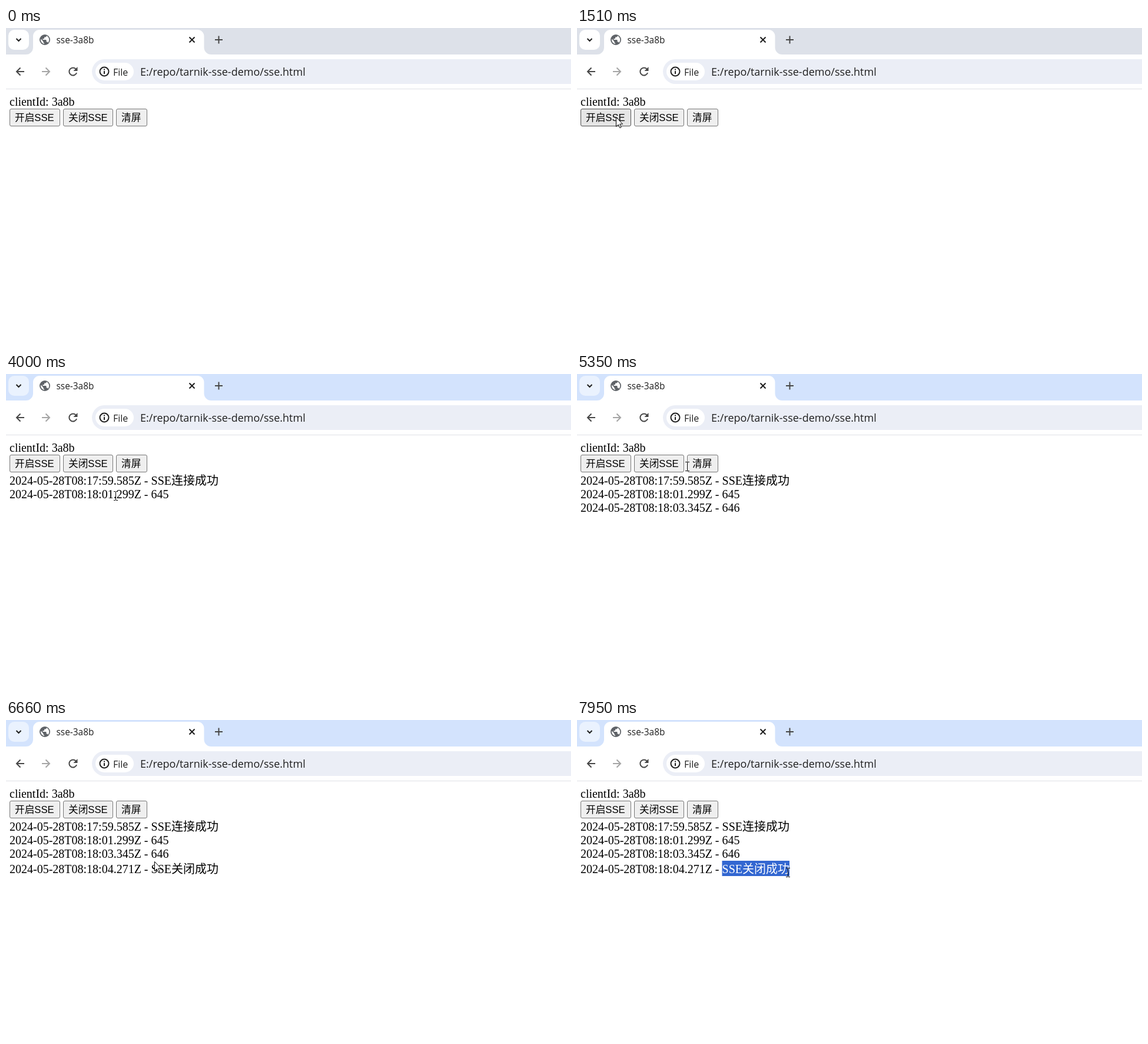
An HTML page for the animation above (8000 ms loop, 960x540 px).

```html
<!DOCTYPE html>
<html lang="zh-CN">
<head>
<meta charset="utf-8">
<title>sse-3a8b</title>
<style>
  html, body { margin: 0; width: 100%; height: 100%; overflow: hidden; background: #fff; }
  svg { display: block; width: 960px; height: 540px; }
  text { white-space: pre; }
  .ui { font-family: "Open Sans", "Noto Sans", sans-serif; fill: #1f1f1f; }
  .page { font: 20px "Liberation Serif", "Noto Sans CJK SC", "Noto Sans CJK", serif; }
  .btn text { font: 16.67px "Liberation Sans", "Noto Sans CJK SC", "Noto Sans CJK", sans-serif; }
  .btn rect { fill: #efefef; stroke: #767676; }
  .btn.hover rect { fill: #e5e5e5; stroke: #4f4f4f; }
  .btn.down rect { fill: #f5f5f5; stroke: #8d8d8d; }
  .icon { fill: none; stroke: #474747; stroke-width: 2; }
  .dark { stroke: #1f1f1f; }
  .off { stroke: #a5a5a5; }
  #strip { fill: #dde1e9; }
  #menu { fill: #fff; }
  .active #strip { fill: #d3e3fd; }
  .active #menu { fill: #eaf2fe; }
</style>
</head>
<body>
<svg id="stage" viewBox="0 0 960 540">
  <defs><clipPath id="clip"><rect class="marked" y="239" height="26"/></clipPath></defs>

  <!-- tab strip -->
  <rect id="strip" width="960" height="45"/>
  <rect id="menu" x="4" y="3" width="35" height="34" rx="10"/>
  <path d="M17.500 18l4 4 4-4" class="icon dark"/>
  <path d="M34 45a12 12 0 0 0 12-12V14a11 11 0 0 1 11-11H325.500a11 11 0 0 1 11 11V33a12 12 0 0 0 12 12Z" fill="#fff"/>
  <circle cx="66" cy="20" r="9" fill="#5f6368"/>
  <path d="M65 27A7.200 7.200 0 0 1 59 18.400l4.300 4.300v1q0 1.700 1.700 1.800ZM71.300 24.900q-.4-1.300-1.700-1.300h-1v-2.700q0-.9-.9-.9h-5.300v-1.800h1.800q.9 0 .9-.9v-1.800h1.800q1.800 0 1.800-1.800v-.4A7.200 7.200 0 0 1 71.300 24.900Z" fill="#fff"/>
  <text class="ui" x="85.500" y="26" font-size="15.400">sse-3a8b</text>
  <path d="M311.500 15.500l9 9m0-9l-9 9" class="icon dark"/>
  <path d="M355 20h13m-6.500-6.500v13" class="icon"/>

  <!-- toolbar -->
  <path d="M31 74H18m6.500-6.500L18 74l6.500 6.500" class="icon"/>
  <path d="M61 74h13m-6.500-6.500L74 74l-6.500 6.500" class="icon off"/>
  <path d="M119 70a6.500 6.500 0 1 0 1 6" class="icon"/>
  <path d="M121.500 66v7h-7Z" fill="#474747"/>
  <rect x="146" y="53" width="850" height="42" rx="21" fill="#ebeef6"/>
  <rect x="152" y="59" width="65" height="30" rx="15" fill="#fff"/>
  <circle cx="167" cy="74" r="7.500" class="icon dark"/>
  <path d="M167 73v5m0-8.500v2" class="icon dark"/>
  <text class="ui" x="182" y="81" font-size="16">File</text>
  <text class="ui" x="228" y="81" font-size="18">E:/repo/tarnik-sse-demo/sse.html</text>
  <rect y="103" width="960" height="1" fill="#dfe1e5"/>

  <g class="page">
    <text x="6" y="132">clientId: 3a8b</text>
    <g id="buttons"></g>
    <g id="log"></g>
    <rect class="marked" y="239" height="26" fill="#3367d1"/>
    <g id="markedText" fill="#fff" clip-path="url(#clip)"></g>
  </g>

  <g id="cursor">
    <path id="arrow" d="M.5.5V16.500L4.200 13l2.600 5.600 2.400-1-2.500-5.500h4.900Z" fill="#fff" stroke="#000"/>
    <path id="beam" d="M-3-7.500h3m1 0h3M.5-7v14M-3 7.500h3m1 0h3" fill="none" stroke="#000"/>
  </g>
</svg>
<script>
const LOOP = 8000;
const REFRESH = 70;
const CLICKS = [1550, 6160];
const HOLD = 100;
const DRAG = { start: 7000, end: 7680 };

// Pointer moves: start, end, then where it comes to rest
const START = [656, 460];
const MOVES = [
  [130, 470, 308, 300],
  [940, 1220, 97, 164],
  [1290, 1430, 66, 151],
  [1760, 2190, 225, 236],
  [2660, 2870, 195, 216],
  [4000, 4000, 186, 207],
  [4070, 4620, 165, 154],
  [5020, 5150, 182, 161],
  [5350, 5350, 187, 157],
  [5420, 5630, 160, 154],
  [6370, 6660, 252, 240],
  [6730, 6800, 236, 250],
  [DRAG.start, DRAG.end, 366, 258],
  [7810, 7950, 358, 259]
];

const $ = id => document.getElementById(id);
const show = (el, on) => { el.style.display = on ? '' : 'none'; };
const ease = f => f * f * (3 - 2 * f);

function add(parent, tag, attrs, text = '') {
  const el = document.createElementNS('http://www.w3.org/2000/svg', tag);
  for (const name in attrs) el.setAttribute(name, attrs[name]);
  el.textContent = text;
  parent.append(el);
  return el;
}

const buttons = ['开启SSE', '关闭SSE', '清屏'].map((label, i) => {
  const x = 6 + 90.5 * i;
  const left = Math.round(x);
  const right = Math.round(x + (label.includes('SSE') ? 85.5 : 53));
  const el = add($('buttons'), 'g', { class: 'btn' });
  add(el, 'rect', { x: left + .5, y: 137.5, width: right - left - 1, height: 29, rx: 2.5 });
  add(el, 'text', { x: left + 9, y: 158 }, label);
  return { el, left, right, press: CLICKS[i] };
});

// Lines holding Chinese glyphs are taller
let baseline = 162;
const log = [
  [CLICKS[0] + HOLD, '17:59.585Z - SSE连接成功'],
  [3270, '18:01.299Z - 645'],
  [5350, '18:03.345Z - 646'],
  [CLICKS[1] + HOLD, '18:04.271Z - SSE关闭成功']
].map(([at, entry]) => {
  const y = baseline += entry.includes('SSE') ? 26 : 23;
  const el = add($('log'), 'text', { x: 6, y }, '2024-05-28T08:' + entry);
  return { at, y, el, right: 6 + el.getComputedTextLength() };
});

const lastLine = log[log.length - 1];
const lastText = lastLine.el.textContent;
const firstMarked = lastText.indexOf('SSE');
const charEdges = [...lastText.slice(firstMarked)]
  .map((_, i) => lastLine.el.getEndPositionOfChar(firstMarked + i).x);
const markLeft = lastLine.el.getStartPositionOfChar(firstMarked).x;
const marked = document.querySelectorAll('.marked');
marked.forEach(el => el.setAttribute('x', markLeft));
$('markedText').append(lastLine.el.cloneNode(true));

function pointerAt(t) {
  let [x, y] = START;
  for (const [from, to, endX, endY] of MOVES) {
    if (t < from) break;
    const shown = Math.floor((t - from) / REFRESH + 1) * REFRESH;
    const f = ease(Math.min(1, shown / (to - from + REFRESH)));
    x += (endX - x) * f;
    y += (endY - y) * f;
  }
  return [Math.round(x), Math.round(y)];
}

function drawCursor(t, x, y) {
  const onLine = log.some(l => t >= l.at && x < l.right && y > l.y - 18 && y < l.y + 5);
  const inGap = x > buttons[1].right && x <= buttons[2].left && y > 137 && y < 166;
  const dragging = t >= DRAG.start && t < DRAG.end;
  const beam = onLine || inGap || dragging;
  show($('cursor'), t >= MOVES[0][0]);
  show($('arrow'), !beam);
  show($('beam'), beam);
  $('cursor').setAttribute('transform', `translate(${x} ${y})`);
}

function drawSelection(t) {
  const reach = t < DRAG.start ? 0 : pointerAt(Math.min(t, DRAG.end))[0];
  const right = Math.max(markLeft, ...charEdges.filter(edge => edge <= reach + 6));
  marked.forEach(el => el.setAttribute('width', right - markLeft));
}

function draw(t) {
  const [x, y] = pointerAt(t);
  $('stage').classList.toggle('active', t >= CLICKS[0]);
  for (const { el, left, right, press } of buttons) {
    el.classList.toggle('hover', x > left && x < right && y > 137 && y < 166);
    el.classList.toggle('down', t >= press && t < press + HOLD);
  }
  for (const line of log) show(line.el, t >= line.at);
  drawCursor(t, x, y);
  drawSelection(t);
}

const start = performance.now();
function tick() {
  draw((performance.now() - start) % LOOP);
  requestAnimationFrame(tick);
}
tick();
</script>
</body>
</html>
```
